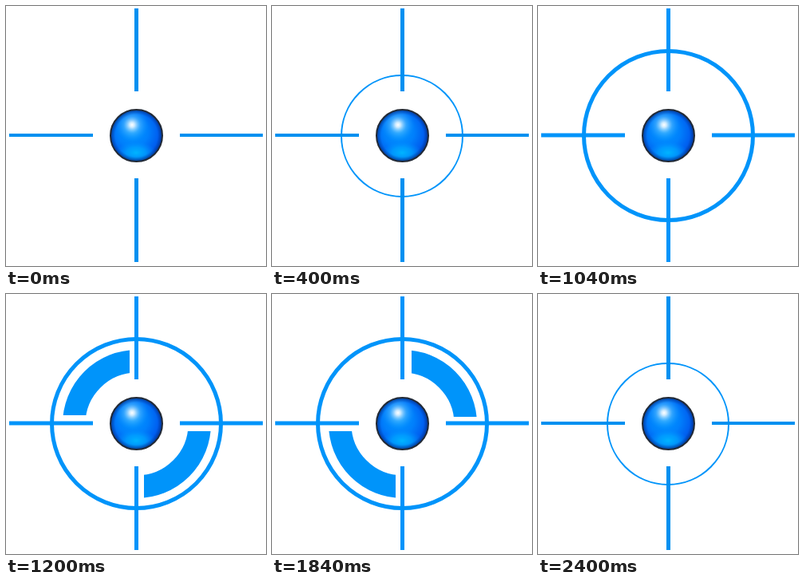
An HTML page for the animation above (2.8 s loop, 326 by 326 pixels).

```html
<!DOCTYPE html>
<html lang="en">
<head>
<meta charset="utf-8">
<title>Target loop</title>
<style>
  html, body { margin: 0; width: 100%; height: 100%; overflow: hidden; background: #fff; }
  svg { display: block; width: 326px; height: 326px; }
  #rings, #cross { fill: none; stroke: #0094fa; }
</style>
</head>
<body>
<svg viewBox="0 0 326 326">
  <defs>
    <radialGradient id="body" gradientUnits="userSpaceOnUse" cx="159" cy="158" r="42">
      <stop offset="0" stop-color="#0096ff"/>
      <stop offset=".45" stop-color="#0080fc"/>
      <stop offset=".75" stop-color="#0060f0"/>
      <stop offset="1" stop-color="#0046cc"/>
    </radialGradient>
    <radialGradient id="glow" gradientUnits="userSpaceOnUse" cx="0" cy="0" r="1"
                    gradientTransform="translate(163 184) scale(25 14)">
      <stop offset="0" stop-color="#00b4ff"/>
      <stop offset=".5" stop-color="#00a4ff" stop-opacity=".75"/>
      <stop offset="1" stop-color="#0090ff" stop-opacity="0"/>
    </radialGradient>
    <radialGradient id="shine" gradientUnits="userSpaceOnUse" cx="158" cy="149" r="21">
      <stop offset="0" stop-color="#fff"/>
      <stop offset=".15" stop-color="#e4f5ff" stop-opacity=".9"/>
      <stop offset=".5" stop-color="#60c0ff" stop-opacity=".5"/>
      <stop offset="1" stop-color="#1098ff" stop-opacity="0"/>
    </radialGradient>
    <radialGradient id="rim" gradientUnits="userSpaceOnUse" cx="163.5" cy="162.5" r="33">
      <stop offset=".8" stop-color="#003090" stop-opacity="0"/>
      <stop offset="1" stop-color="#002060" stop-opacity=".7"/>
    </radialGradient>
    <clipPath id="falling"><path d="M0 0H155V152H0zM173 172H326V326H173z"/></clipPath>
    <clipPath id="rising"><path d="M175 0H326V154H175zM0 172H155V326H0z"/></clipPath>
  </defs>

  <g id="rings">
    <circle id="thin" cx="163" cy="163" r="76" stroke-width="2"/>
    <circle id="thick" cx="163.5" cy="162.5" r="106" stroke-width="5"/>
    <circle id="arcs" cx="164" cy="163" r="78.75" stroke-width="28.5"/>
  </g>
  <g id="cross">
    <path d="M163.5 3V107M163.5 216V321" stroke-width="5"/>
    <path id="horizon" d="M4 162H109M218 162H322"/>
  </g>
  <g id="ball">
    <circle cx="163.5" cy="162.5" r="32.5" fill="url(#body)"/>
    <circle cx="163.5" cy="162.5" r="32.5" fill="url(#glow)"/>
    <circle cx="163.5" cy="162.5" r="32.5" fill="url(#shine)"/>
    <circle cx="163.5" cy="162.5" r="32.5" fill="url(#rim)" stroke="#222a36" stroke-width="2"/>
  </g>
</svg>
<script>
  const STEP = 400;
  const poses = ["idle", "thin", "thick", "falling", "rising", "falling", "thin"];
  const byId = id => document.getElementById(id);
  const show = (id, visible) => byId(id).setAttribute("visibility", visible ? "visible" : "hidden");

  function draw(time) {
    const pose = poses[Math.floor(time / STEP) % poses.length];
    const hasArcs = pose === "falling" || pose === "rising";
    const locked = hasArcs || pose === "thick";
    show("thin", pose === "thin");
    show("thick", locked);
    show("arcs", hasArcs);
    if (hasArcs) byId("arcs").setAttribute("clip-path", `url(#${pose})`);
    byId("horizon").setAttribute("stroke-width", locked ? 5 : 4);
    byId("cross").style.stroke = locked ? "#0094fa" : "#0090f0";
  }

  const start = performance.now();
  function tick() {
    draw(performance.now() - start);
    requestAnimationFrame(tick);
  }
  tick();
</script>
</body>
</html>
```
